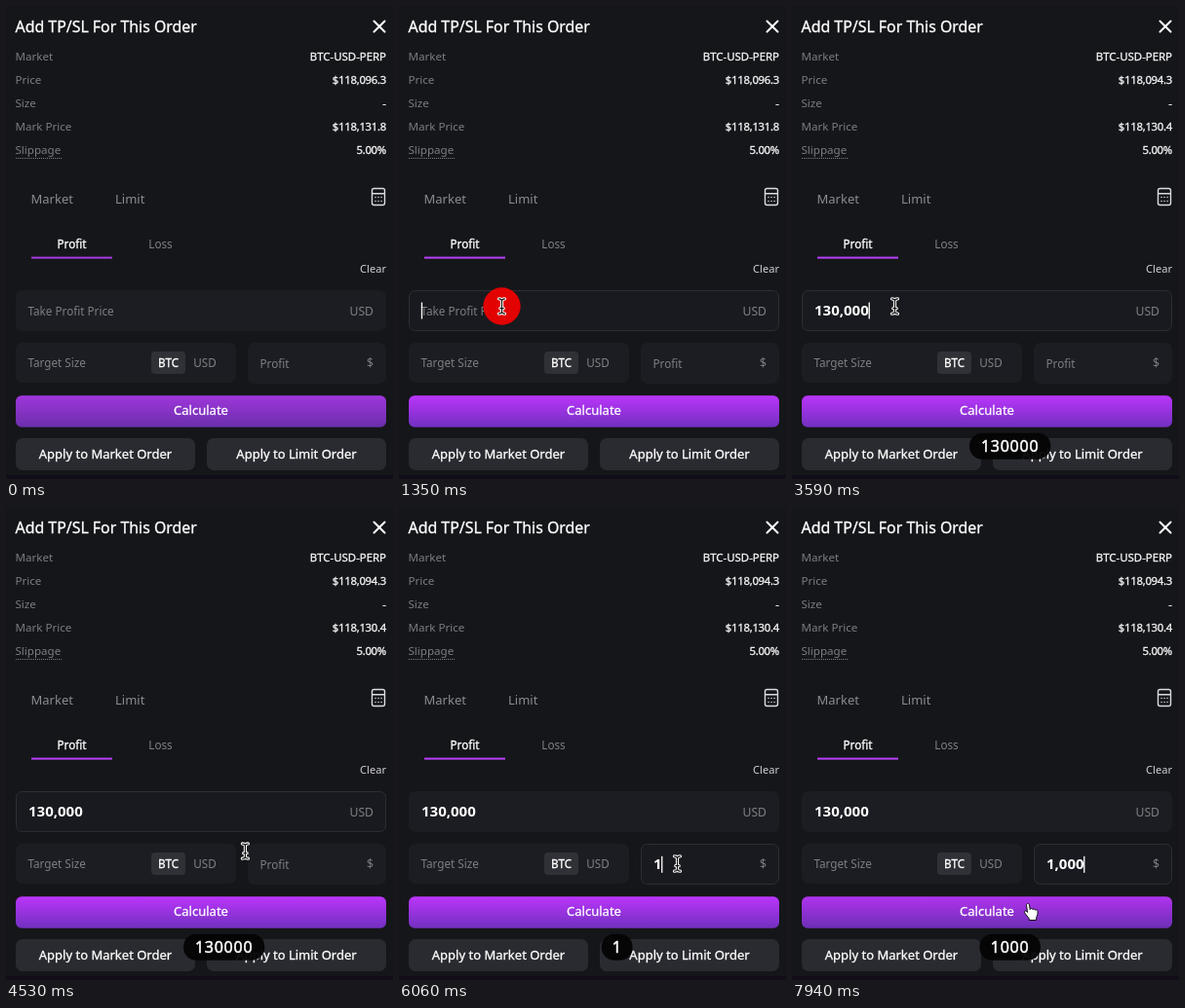
An HTML page for the animation above (8000 ms loop, 397 px wide and 486 px high).

```html
<!DOCTYPE html>
<html lang="en">
<head>
<meta charset="utf-8">
<title>Add TP/SL</title>
<style>
  html, body { margin: 0; width: 100%; height: 100%; overflow: hidden; background: #15161a; }
  svg { display: block; width: 397px; height: 486px; --top: #bb35fb; --low: #7230c0; --line: #b83ffc; }
  svg.dim { --top: #9f36dc; --low: #6b2fab; --line: #a43bdf; }
  text { font-family: "Noto Sans", "Open Sans", sans-serif; font-size: 11.7px; fill: #f0f0f2; white-space: pre; }
  /* a hairline stroke gives the medium weight */
  .title, .val, .btn, .on { fill: #fff; stroke: #fff; stroke-width: .3px; }
  .title { font-size: 15.9px; }
  .row text { fill: #7c7d82; font-size: 11.6px; }
  .row .val { fill: #f0f0f2; font-size: 11.4px; }
  .num { letter-spacing: -.3px; }
  .end { text-anchor: end; }
  .mid { text-anchor: middle; }
  .tab { font-size: 13px; fill: #8b8c91; }
  .hint { fill: #7d7e83; }
  .unit { font-size: 12.2px; fill: #808186; }
  .off { fill: #808186; }
  .btn { font-size: 13px; text-anchor: middle; }
  .typed { font-size: 15px; font-weight: 700; fill: #fff; }
  .field { fill: #1c1d22; stroke: #1c1d22; }
  .field.focus { fill: #191a1f; stroke: #2d2e35; }
  .keys { font-size: 16px; letter-spacing: .75px; fill: #fff; stroke: #fff; stroke-width: .5px; text-anchor: middle; }
  .out { fill: none; stroke-linecap: round; stroke-linejoin: round; }
</style>
</head>
<body>
<svg id="stage" viewBox="0 0 397 486">
  <defs>
    <linearGradient id="violet" x2="0" y2="1">
      <stop stop-color="var(--top)"/>
      <stop offset="1" stop-color="var(--low)"/>
    </linearGradient>
  </defs>
  <rect width="397" height="486" fill="#15161a"/>
  <rect y="482" width="397" height="4" fill="#120d18"/>

  <text class="title" x="9.5" y="26.5">Add TP/SL For This Order</text>
  <path class="out" d="M377.5 15.5l11 11m0-11l-11 11" stroke="#fff" stroke-width="2"/>

  <g class="row">
    <text x="9.5" y="56.2">Market</text><text class="val end" x="390" y="56">BTC-USD-PERP</text>
    <text x="9.5" y="80.2">Price</text><text id="price" class="val num end" x="390" y="80"></text>
    <text x="9.5" y="104.2">Size</text><text class="val end" x="390" y="104">-</text>
    <text x="9.5" y="128.2">Mark Price</text><text id="mark" class="val num end" x="390" y="128"></text>
    <text x="9.5" y="152.2">Slippage</text><text class="val num end" x="390" y="152">5.00%</text>
  </g>
  <path d="M10 156.5H57" stroke="#7c7d82" stroke-dasharray="1 1"/>

  <text class="tab" x="25.5" y="202.6">Market</text>
  <text class="tab" x="112" y="202.6">Limit</text>
  <g class="out" stroke="#dcdce0" stroke-width="1.4">
    <rect x="375.5" y="187.5" width="13" height="17" rx="2"/>
    <path d="M376 192.7h12"/>
    <path d="M379 196.5h.1m2.9 0h.1m2.9 0h.1M379 200.5h.1m2.9 0h.1m2.9 0h.1"/>
  </g>

  <text class="mid on" x="67.5" y="249">Profit</text>
  <text class="mid off" x="158.5" y="249">Loss</text>
  <rect x="26" y="257.6" width="83" height="2" fill="var(--line)"/>
  <text class="end" x="390" y="274.2" style="font-size:11.1px;fill:#cfcfd3">Clear</text>

  <rect id="box0" class="field" x="10.5" y="292.5" width="379" height="41" rx="6"/>
  <text id="hint0" class="hint" x="22.5" y="318.2">Take Profit Price</text>
  <text id="typed0" class="typed" x="23" y="318.3"></text>
  <text class="unit end" x="377" y="317.5">USD</text>

  <rect class="field" x="10.5" y="346.5" width="225" height="40" rx="6"/>
  <text class="hint" x="22.5" y="371.2">Target Size</text>
  <rect x="149" y="355" width="35" height="23" rx="4" fill="#303136"/>
  <text class="mid on" x="166.6" y="370.7">BTC</text>
  <text class="mid off" x="204" y="370.7">USD</text>

  <rect id="box1" class="field" x="248.5" y="346.5" width="141" height="41" rx="6"/>
  <text id="hint1" class="hint" x="260.5" y="371.7">Profit</text>
  <text id="typed1" class="typed" x="261" y="372.2"></text>
  <text class="unit end" x="377" y="371.3">$</text>

  <rect id="calc" x="10" y="400.3" width="380" height="32.4" rx="6" fill="url(#violet)"/>
  <text class="btn" x="200" y="420.4">Calculate</text>
  <rect x="10" y="444" width="184" height="33" rx="7" fill="#2a2b30"/>
  <text class="btn" x="102" y="464.6">Apply to Market Order</text>
  <rect x="206" y="444" width="184" height="33" rx="7" fill="#2a2b30"/>
  <text class="btn" x="298" y="464.6">Apply to Limit Order</text>

  <rect id="caret" width="1.3" height="17" fill="#fff"/>
  <g id="bubble">
    <rect id="pill" y="438.7" height="27" rx="13" fill="#050506" fill-opacity=".95"/>
    <text id="keys" class="keys" x="223.6" y="458"></text>
  </g>

  <circle id="ring" fill="#e20202"/>
  <g id="pointer">
    <g id="beam" class="out" transform="scale(.85)">
      <path id="bar" d="M-3.5-9Q0-9 0-6.5Q0-9 3.5-9M-3.5 9Q0 9 0 6.5Q0 9 3.5 9M0-6.5V6.5M-2 2.5H2"
        stroke="#fff" stroke-width="3.8"/>
      <path d="M-3.5-9Q0-9 0-6.5Q0-9 3.5-9M-3.5 9Q0 9 0 6.5Q0 9 3.5 9M0-6.5V6.5M-2 2.5H2"
        stroke="#111" stroke-width="1.3"/>
    </g>
    <path id="hand" d="M-4.5-6.5c0-2 2.7-2 3 0l.7 4.6c.3-1.5 2.5-1.4 2.8.1.5-1 2.3-.8 2.6.5.9-.7 2.3-.2 2.4 1.1.2 2.7-.2 4.3-1.3 6.2V9H-1.8V7.2C-3.4 5.4-5 3.5-6.4 1.4c-1-1.6.8-2.6 2-1.4l1 1z"
      fill="#fff" stroke="#111" stroke-width="1" stroke-linejoin="round"/>
  </g>
</svg>
<script>
  const LOOP = 8000;
  const $ = id => document.getElementById(id);
  const stage = $('stage');

  // Key presses per field: the time each digit lands, and when its bubble has gone.
  const fields = [
    { digits: '130000', at: [2240, 2650, 2760, 3180, 3410, 3590], focus: 1290, blur: 5290, gone: 5760, x: 23.5, y: 304.5 },
    { digits: '1000', at: [6060, 6530, 6710, 6940], focus: 5290, blur: LOOP, gone: LOOP, x: 261.2, y: 358.8 }
  ];
  const caretOn = [[1290, 1760], [2060, 4060], [4560, 5060], [5290, 5760], [6060, 7440], [7930, LOOP]];
  const moves = [
    { from: 440, to: 1240, a: [178, 504], b: [105.5, 308.5] },
    { from: 4010, to: 4760, a: [105.5, 308.5], b: [285.5, 366.5] },
    { from: 7360, to: 7940, a: [285.5, 366.5], b: [245, 415.5] }
  ];
  const clicks = [1290, 5290];

  const within = (t, [a, b]) => t >= a && t < b;
  const clamp = v => Math.min(1, Math.max(0, v));
  const ease = p => p * p * (3 - 2 * p);
  const show = (el, on) => el.setAttribute('visibility', on ? 'visible' : 'hidden');
  const set = (el, attrs) => { for (const k in attrs) el.setAttribute(k, attrs[k]); };
  const write = (el, s) => { if (el.textContent !== s) el.textContent = s; };
  const commas = s => s.replace(/\B(?=(\d{3})+$)/g, ',');

  function pointerAt(t) {
    const m = moves.filter(m => t >= m.from).pop() || moves[0];
    const p = ease(clamp((t - m.from) / (m.to - m.from)));
    return m.a.map((v, i) => v + (m.b[i] - v) * p);
  }

  function drawFields(t) {
    let pressed = '', fade = 0;
    fields.forEach((f, i) => {
      const raw = f.digits.slice(0, f.at.filter(a => t >= a).length);
      const active = within(t, [f.focus, f.blur]);
      const typed = $('typed' + i);
      write(typed, commas(raw));
      show($('hint' + i), !raw);
      $('box' + i).classList.toggle('focus', active);
      if (active) {
        const w = raw ? typed.getComputedTextLength() : 0;
        set($('caret'), { x: f.x + w - .7, y: f.y });
      }
      if (raw && t < f.gone) {
        pressed = raw;
        fade = f.gone < LOOP ? clamp((f.gone - t) / 200) : 1;
      }
    });
    show($('caret'), caretOn.some(s => within(t, s)));

    const w = 21.4 + 10.3 * pressed.length;
    write($('keys'), pressed);
    set($('pill'), { x: 223.7 - w / 2, width: w });
    set($('bubble'), { opacity: fade });
  }

  function drawPointer(t) {
    const [x, y] = pointerAt(t);
    const overCalc = y > 400 && y < 433;
    const overButton = overCalc || y > 444;
    set($('pointer'), { transform: `translate(${x} ${y})` });
    show($('hand'), overButton);
    show($('beam'), !overButton);
    set($('calc'), { opacity: overCalc ? .94 : 1 });
    if (y < 334 && t < clicks[0]) $('box0').classList.add('focus');

    const hit = clicks.find(c => within(t, [c, c + 470]));
    show($('ring'), hit !== undefined);
    if (hit !== undefined) {
      const dt = t - hit;
      set($('ring'), { cx: x, cy: y, r: 24 * (1 - Math.exp(-(dt + 30) / 57)), opacity: clamp((470 - dt) / 250) });
    }
  }

  function draw(t) {
    const later = t >= 3350;
    stage.classList.toggle('dim', t < 60);
    write($('price'), later ? '$118,094.3' : '$118,096.3');
    write($('mark'), later ? '$118,130.4' : '$118,131.8');
    drawFields(t);
    drawPointer(t);
  }

  const start = performance.now();
  function tick() {
    draw((performance.now() - start) % LOOP);
    requestAnimationFrame(tick);
  }
  tick();
</script>
</body>
</html>
```
